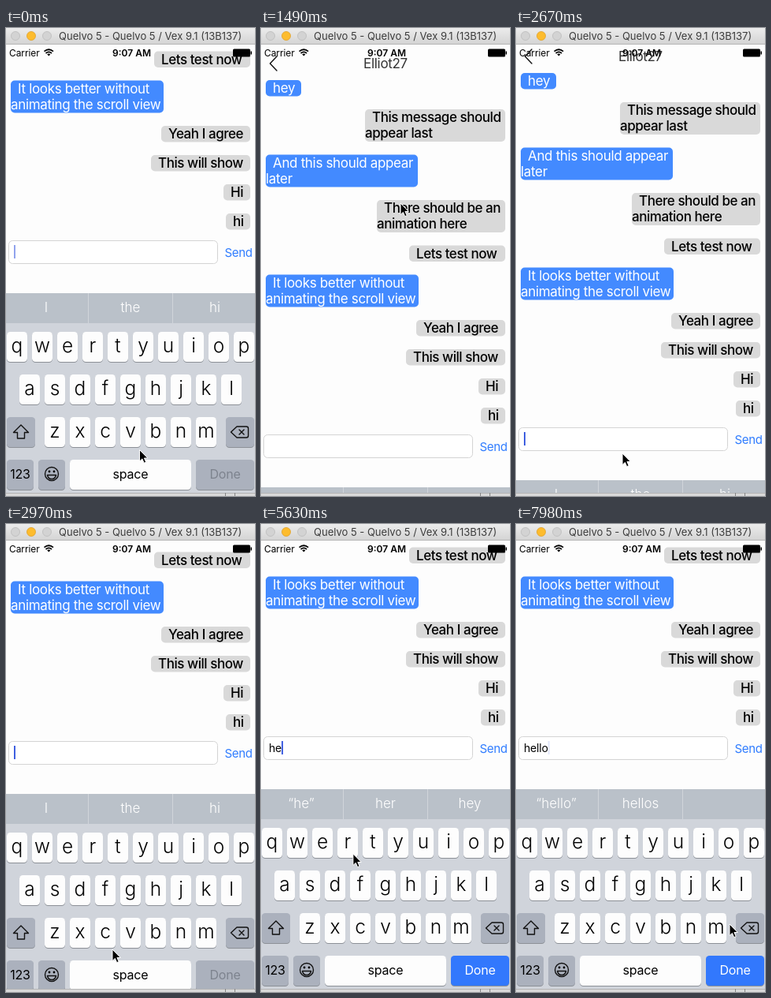
Animation, 316 px wide and 593 px high, one loop 8000 ms. Source, as an HTML page:

```html
<!DOCTYPE html>
<html lang="en">
<head>
<meta charset="utf-8">
<title>Chat keyboard</title>
<style>
html, body { margin: 0; width: 100%; height: 100%; overflow: hidden; background: #fdfdfd; }
svg { display: block; width: 100vw; height: 100vh; font-family: Inter, "Liberation Sans", sans-serif; }
.mid { text-anchor: middle; }
.msg { font-size: 17px; letter-spacing: -.33px; fill: #fff; }
.mine { font-weight: 500; letter-spacing: -.45px; fill: #000; }
.key { font-size: 24.5px; font-weight: 300; }
.word { font-size: 17px; font-weight: 300; fill: #fff; }
.label { font-size: 16px; letter-spacing: -.2px; }
.line { fill: none; stroke: #111; stroke-width: 1.4; stroke-linejoin: round; stroke-linecap: round; }
</style>
</head>
<body>
<svg id="stage" viewBox="0 0 316 593" xmlns="http://www.w3.org/2000/svg">
  <defs>
    <linearGradient id="chrome" x2="0" y2="1">
      <stop stop-color="#ececec"/><stop offset="1" stop-color="#d3d3d3"/>
    </linearGradient>
    <clipPath id="screen"><rect y="21" width="316" height="568"/></clipPath>
  </defs>
  <rect width="316" height="593" fill="#fdfdfd"/>
  <g clip-path="url(#screen)">
    <g id="view">
      <path d="M20-210L11.5-201L20-192" class="line"/>
      <text x="158" y="-195" class="mid" font-size="17" letter-spacing="-.3" fill="#333">Elliot27</text>
      <g id="bubbles"></g>
      <rect x="3.5" y="269.5" width="265" height="29" rx="5" fill="#fff" stroke="#d4d4d4"/>
      <text id="typed" x="10" y="288.5" font-size="14" letter-spacing="-.2"></text>
      <rect id="caret" y="275" width="2" height="17" fill="#3f5fe0"/>
      <text x="277.5" y="290" font-size="15" letter-spacing="-.3" fill="#2f7cff">Send</text>
      <rect y="336" width="316" height="253" fill="#d0d4db"/>
      <rect y="336" width="316" height="38" fill="#bac1c9"/>
      <path d="M104.5 336v38M211.5 336v38" stroke="#d0d5da"/>
      <g id="words"></g>
      <g id="keys"></g>
      <path class="line" d="M19 503L28.5 512.5H23.5V520H14.5V512.5H9.5Z"/>
      <path class="line" d="M285.5 512L293 505H305Q307.5 505 307.5 507.5V516.5Q307.5 519 305 519H293ZM296 509l6 6m0-6l-6 6"/>
      <circle class="line" cx="58" cy="565" r="8.5"/>
      <path class="line" d="M52.5 566.5H63.5Q62.5 571.5 58 571.5T52.5 566.5Z"/>
      <circle cx="55" cy="562" r="1.4"/><circle cx="61" cy="562" r="1.4"/>
      <g id="popup">
        <path id="balloon" fill="#fdfdfd" stroke="#a5a9b0" stroke-width=".8"/>
        <text id="big" class="mid" font-size="40" font-weight="300"></text>
      </g>
    </g>
    <text x="4" y="35.5" font-size="12" letter-spacing="-.1">Carrier</text>
    <g fill="none" stroke="#000" stroke-width="1.7">
      <path d="M48.5 29.7Q54.3 24.8 60 29.7M50.5 32Q54.3 28.8 58 32"/>
      <path d="M52.2 33.3Q54.3 31.7 56.4 33.3L54.3 35.5Z" fill="#000" stroke="none"/>
    </g>
    <text x="159.5" y="35.5" class="mid" font-size="12" font-weight="600">9:07 AM</text>
    <rect x="288" y="26.5" width="22" height="10" rx="1.5"/>
    <rect x="310.5" y="29.5" width="1.5" height="4"/>
  </g>
  <rect width="316" height="21" fill="url(#chrome)"/>
  <path d="M0 20.5H316" stroke="#b5b5b5"/>
  <g stroke-width=".8">
    <circle cx="12" cy="10" r="5.5" fill="#d3d3d3" stroke="#bcbcbc"/>
    <circle cx="32" cy="10" r="5.5" fill="#fdbc2e" stroke="#e0a028"/>
    <circle cx="52" cy="10" r="5.5" fill="#d3d3d3" stroke="#bcbcbc"/>
  </g>
  <text x="67" y="15" font-size="13" fill="#3c3c3c">Quelvo 5 - Quelvo 5 / Vex 9.1 (13B137)</text>
  <rect y="589" width="316" height="4" fill="#d9d9d9"/>
  <path d="M0 589.5H316" stroke="#b4b4b4"/>
  <path d="M278.5 589v4M290.5 589v4" stroke="#858585"/>
  <path id="mouse" d="M0 0V14.5L3.4 11.4L5.7 16.7L8.2 15.6L5.9 10.5H10.3Z" stroke="#fff"/>
</svg>
<script>
const $ = id => document.getElementById(id);
const LOOP = 8000, TRAVEL = 253, CLOSE = 1172, OPEN = 2646;

function add(group, tag, attrs, text = "") {
  const el = document.createElementNS("http://www.w3.org/2000/svg", tag);
  for (const name in attrs) el.setAttribute(name, attrs[name]);
  el.textContent = text;
  return group.appendChild(el);
}

// Messages: left edge, right edge, lines
const messages = [
  [6, 51, "hey"],
  [132, 310, "This message should", "appear last"],
  [6, 199, "And this should appear", "later"],
  [147, 310, "There should be an", "animation here"],
  [188, 310, "Lets test now"],
  [6, 200, "It looks better without", "animating the scroll view"],
  [197, 310, "Yeah I agree"],
  [184, 310, "This will show"],
  [276, 310, "Hi"],
  [279, 310, "hi"]
];
let bubbleY = -180;
for (const [left, right, ...lines] of messages) {
  const mine = right === 310, height = 20.5 * lines.length;
  add($("bubbles"), "rect", { x: left, y: bubbleY, width: right - left, height, rx: 5, fill: mine ? "#d9d9d9" : "#438aff" });
  lines.forEach((line, i) => add($("bubbles"), "text",
    { x: left + (i ? 0 : 9), y: bubbleY + 16 + 20 * i, class: mine ? "msg mine" : "msg" }, line));
  bubbleY += height + 16.5;
}

// Keyboard
const keyPos = {};
function addKey(x, y, width, fill) {
  add($("keys"), "rect", { x, y: y + 1, width, height: 38, rx: 4.5, fill: "#8c9097" });
  return add($("keys"), "rect", { x, y, width, height: 38, rx: 4.5, fill });
}
["qwertyuiop", "asdfghjkl", "zxcvbnm"].forEach((row, r) => {
  [...row].forEach((char, i) => {
    const x = [14, 30, 62][r] + 32 * i, y = 385 + 54 * r;
    keyPos[char] = [x, y];
    addKey(x - 13, y, 26, "#fdfdfd");
    add($("keys"), "text", { x, y: y + 26, class: "key mid" }, char);
  });
});
const GREY = "#abb1bd";
addKey(1, 493, 36, GREY);
addKey(279, 493, 36, GREY);
addKey(1, 547, 34, GREY);
addKey(41, 547, 34, GREY);
addKey(81, 547, 154, "#fdfdfd");
const doneKey = addKey(241, 547, 74, GREY);
const addLabel = (x, text) => add($("keys"), "text", { x, y: 571, class: "label mid" }, text);
addLabel(18, "123");
addLabel(158, "space");
const doneText = addLabel(278, "Done");
const hintTexts = [51, 158, 265].map(x => add($("words"), "text", { x, y: 359.5, class: "word mid" }));

// Typing: time, text, suggestions
const typing = [
  [-560, "", "I", "the", "hi"],
  [4600, "h", "“h”", "have", "how"],
  [5480, "he", "“he”", "her", "hey"],
  [6200, "hel", "“hel”", "help", "hello"],
  [6500, "hell", "“hell”", "hello", "he'll"],
  [7380, "hello", "“hello”", "hellos", ""]
];
const presses = [[4300, 4600, "h"], [5185, 5480, "e"], [6060, 6200, "l"], [6355, 6500, "l"], [7085, 7380, "o"]];

// Pointer stops: time, x, y
const stops = [
  [0, 169.5, 534.5], [300, 169.5, 534.5], [1040, 177, 222], [1620, 177, 222],
  [2500, 135, 539], [3150, 135, 539], [3560, 152, 496], [4000, 192, 460], [4600, 192, 460],
  [5180, 82, 408], [5480, 82, 408], [6050, 288, 467], [6500, 288, 467], [6800, 270, 432],
  [6945, 268, 408], [7380, 268, 408], [7820, 271, 507], [LOOP, 271, 507]
];

function pointerAt(t) {
  const i = Math.max(1, stops.findIndex(s => s[0] > t));
  const [t0, x0, y0] = stops[i - 1], [t1, x1, y1] = stops[i];
  const p = (t - t0) / (t1 - t0), e = p * p * (3 - 2 * p);
  return [x0 + (x1 - x0) * e, y0 + (y1 - y0) * e];
}

// Critically damped spring
function spring(ms) {
  const u = Math.max(0, ms) * .0175;
  return 1 - (1 + u) * Math.exp(-u);
}

const clamp = v => Math.min(1, Math.max(0, v));

function hold(t) {
  const turn = 4459, late = t >= turn;
  const start = late ? turn : 0, step = late ? 146.25 : 148.3;
  return start + Math.floor((t - start) / step) * step;
}

function balloonPath(x, y) {
  return `M${x - 27} ${y - 53}q0-10 10-10h34q10 0 10 10v32c0 16-14 12-14 28v26` +
    "q0 5-5 5h-16q-5 0-5-5v-26c0-16-14-12-14-28z";
}

function draw(now) {
  const t = hold(now);
  const offset = t < OPEN ? spring(t - CLOSE) : 1 - spring(t - OPEN);
  $("view").setAttribute("transform", `translate(0 ${Math.round(TRAVEL * offset)})`);

  const [since, text, ...hints] = typing.findLast(s => s[0] <= t);
  $("typed").textContent = text;
  hintTexts.forEach((el, i) => el.textContent = hints[i]);
  doneKey.setAttribute("fill", text ? "#3278fd" : GREY);
  doneText.setAttribute("fill", text ? "#fff" : "#7d838e");

  const blinkFrom = !text && t >= OPEN ? OPEN : since;
  const phase = (t - blinkFrom) % 1000 / 1000;
  const glow = phase < .65 ? clamp((.6 - phase) / .07) : clamp((phase - .7) / .1);
  $("caret").setAttribute("opacity", t >= CLOSE && t < OPEN ? 0 : glow);
  $("caret").setAttribute("x", 10 + (text ? $("typed").getComputedTextLength() : 0));

  const press = presses.find(p => t >= p[0] && t < p[1]);
  $("popup").setAttribute("visibility", press ? "visible" : "hidden");
  if (press) {
    const [x, y] = keyPos[press[2]];
    $("balloon").setAttribute("d", balloonPath(x, y));
    $("big").setAttribute("x", x);
    $("big").setAttribute("y", y - 19);
    $("big").textContent = press[2];
  }
  $("mouse").setAttribute("transform", `translate(${pointerAt(t)})`);
}

const begin = performance.now();
function tick() {
  draw((performance.now() - begin) % LOOP);
  requestAnimationFrame(tick);
}
tick();
</script>
</body>
</html>
```
